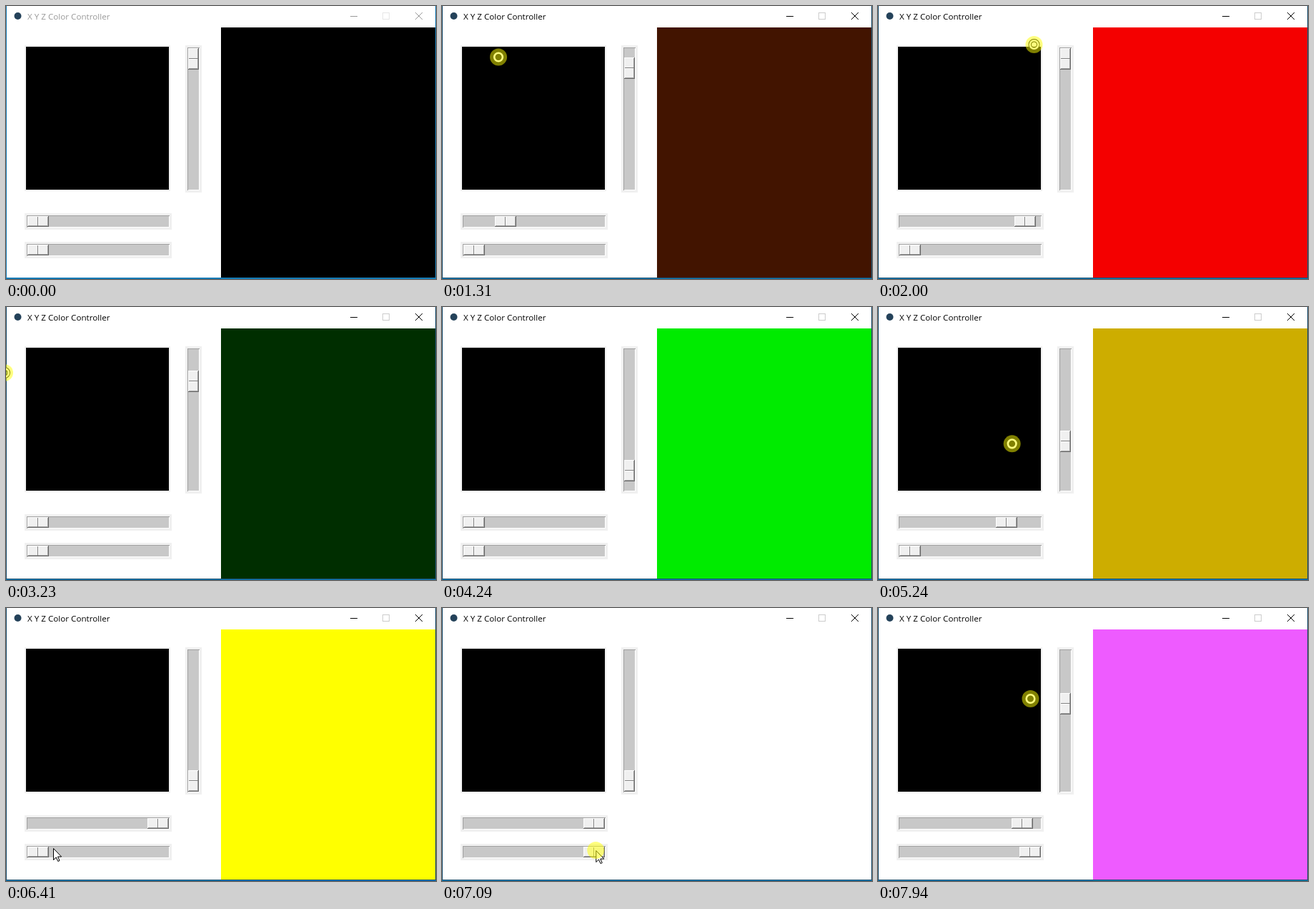
Animation of 602x382 px, one loop 8000 ms. Source, as an HTML page:

```html
<!DOCTYPE html>
<html lang="en">
<head>
<meta charset="utf-8">
<title>X Y Z Color Controller</title>
<style>
  html, body { margin: 0; width: 100%; height: 100%; overflow: hidden; background: #fff; }
  svg { display: block; width: 602px; height: 382px; --ink: #000; --faint: #ccc; --edge: #1d5170; }
  svg.idle { --ink: #999; --faint: #e6e6e6; --edge: #1c7fb8; }
  .box { shape-rendering: crispEdges; }
  .title { font: 11.65px "Open Sans", "Noto Sans", sans-serif; fill: var(--ink); }
  .edge { fill: var(--edge); }
  .icon { fill: none; stroke: var(--ink); }
</style>
</head>
<body>
<svg id="stage" class="idle" viewBox="0 0 602 382">
  <defs>
    <g id="bar" class="box">
      <rect width="206" height="23" fill="#f0f0f0"/>
      <rect x="3" y="3" width="200" height="17" fill="#a0a0a0"/>
      <rect x="4" y="4" width="199" height="16" fill="#fff"/>
      <rect x="4" y="4" width="198" height="15" fill="#c8c8c8"/>
    </g>
    <g id="thumbH" class="box">
      <rect width="30" height="15" fill="#696969"/>
      <rect width="29" height="14" fill="#fff"/>
      <rect x="1" y="1" width="27" height="12" fill="#f0f0f0"/>
      <path d="M28 1h1v13h-28v-1h27z" fill="#a0a0a0"/>
      <rect x="14" y="1" width="1" height="13" fill="#808080"/>
      <rect x="15" y="1" width="1" height="12" fill="#fff"/>
    </g>
  </defs>

  <rect width="602" height="382" fill="#fff"/>
  <circle cx="16.5" cy="14" r="5" fill="#24425a"/>
  <text class="title" x="30" y="19">X Y Z Color Controller</text>
  <path class="icon box" d="M482 14.5h10"/>
  <rect class="box" x="527.5" y="9.5" width="9" height="9" fill="none" stroke="var(--faint)"/>
  <path class="icon" d="M573 9l10 10M583 9l-10 10"/>

  <rect class="box" id="panel" x="301" y="30" width="300" height="350"/>
  <g class="box">
    <rect x="26" y="55" width="204" height="204" fill="#f0f0f0"/>
    <rect x="28" y="57" width="200" height="200"/>
  </g>
  <use href="#bar" transform="matrix(0 1 1 0 251 55)"/>
  <use href="#bar" x="26" y="290"/>
  <use href="#bar" x="26" y="330"/>
  <g id="green"><use href="#thumbH" transform="matrix(0 1 1 0 0 0)"/></g>
  <use id="red" href="#thumbH"/>
  <use id="blue" href="#thumbH"/>

  <g class="box">
    <rect class="edge" width="1" height="382"/>
    <rect class="edge" x="601" width="1" height="382"/>
    <rect class="edge" y="380" width="602" height="1"/>
    <rect y="381" width="602" height="1" fill="#0a78b4"/>
  </g>

  <g id="cursor">
    <g id="ring" fill="none">
      <circle r="5.8" stroke="#000" stroke-width="4.4"/>
      <circle r="5.8" stroke="#fff" stroke-width="2.6"/>
    </g>
    <path id="arrow" d="M.5 .5v16l3.7-3.6 2.6 5.6 2.2-1-2.5-5.5h5.1z" fill="#fff" stroke="#000"/>
    <circle id="glow" r="12" fill="#ff0" fill-opacity=".5"/>
  </g>
</svg>
<script>
  const LOOP = 8000, TICK = 76.9, LAST = 103;
  const PRESS = 13, RELEASE = 76, GRAB = 88, DROP = 93, REPRESS = 99;
  // turning points of the pointer: tick, x, y
  const turns = [
    [1, 403, 353], [11, 44, 76], [PRESS, 44, 76],
    [26, 218.5, 54], [29, 228, 53], [36, 100, 38], [42, -2, 92],
    [52, -7, 270], [55, -14, 240], [62, 56.5, 66.5], [65, 143, 155],
    [RELEASE, 256, 261], [83, 66, 336], [GRAB, 45, 343], [DROP, 235, 337],
    [98, 215, 243], [LAST, 213.5, 127]
  ];
  const el = id => document.getElementById(id);
  const unit = v => Math.min(1, Math.max(0, v));
  const place = (id, x, y) => el(id).setAttribute("transform", `translate(${x} ${y})`);
  const show = (id, on) => el(id).setAttribute("visibility", on ? "visible" : "hidden");
  const slide = v => Math.round(v * 168);

  const slope = (i, c) => turns[i] && turns[i - 1]
    ? (turns[i][c] - turns[i - 1][c]) / (turns[i][0] - turns[i - 1][0]) : 0;

  // harmonic mean keeps the curve from overshooting its turning points
  function tangent(i, c) {
    const a = slope(i, c), b = slope(i + 1, c);
    return a * b > 0 ? 2 * a * b / (a + b) : 0;
  }

  function pointer(k) {
    const i = Math.max(1, turns.findIndex(p => p[0] >= k));
    const p = turns[i - 1], q = turns[i], span = q[0] - p[0];
    const f = unit((k - p[0]) / span), s = f * f * (3 - 2 * f);
    return [1, 2].map(c => p[c] + (q[c] - p[c]) * s
      + span * f * (1 - f) * ((1 - f) * tangent(i - 1, c) - f * tangent(i, c)));
  }

  function padValue(k) {
    if (k < PRESS) return [0, 0];
    const [x, y] = pointer(k > RELEASE && k < REPRESS ? RELEASE : k);
    return [unit((x - 27) / 200), unit((y - 56) / 200)];
  }

  function draw(k) {
    const [x, y] = pointer(k), [r, g] = padValue(k);
    const b = k < GRAB ? 0 : unit((pointer(Math.min(k, DROP))[0] - 45) / 168);
    el("stage").classList.toggle("idle", k < PRESS);
    el("panel").setAttribute("fill", `rgb(${[r, g, b].map(v => Math.round(v * 255))})`);
    place("red", 30 + slide(r), 294);
    place("green", 255, 59 + slide(g));
    place("blue", 30 + slide(b), 334);

    const onPad = (k >= PRESS && k <= RELEASE) || k >= REPRESS;
    const inside = x > 28 && x < 228 && y > 57 && y < 257;
    const seen = k >= 1, round = onPad || inside;
    place("cursor", x, y);
    show("ring", seen && round);
    show("arrow", seen && !round);
    show("glow", onPad || (k >= GRAB && k <= DROP));
  }

  const start = performance.now();
  function loop() {
    const t = (performance.now() - start) % LOOP;
    draw(Math.min(LAST, Math.floor((t + 26) / TICK)));
    requestAnimationFrame(loop);
  }
  loop();
</script>
</body>
</html>
```
